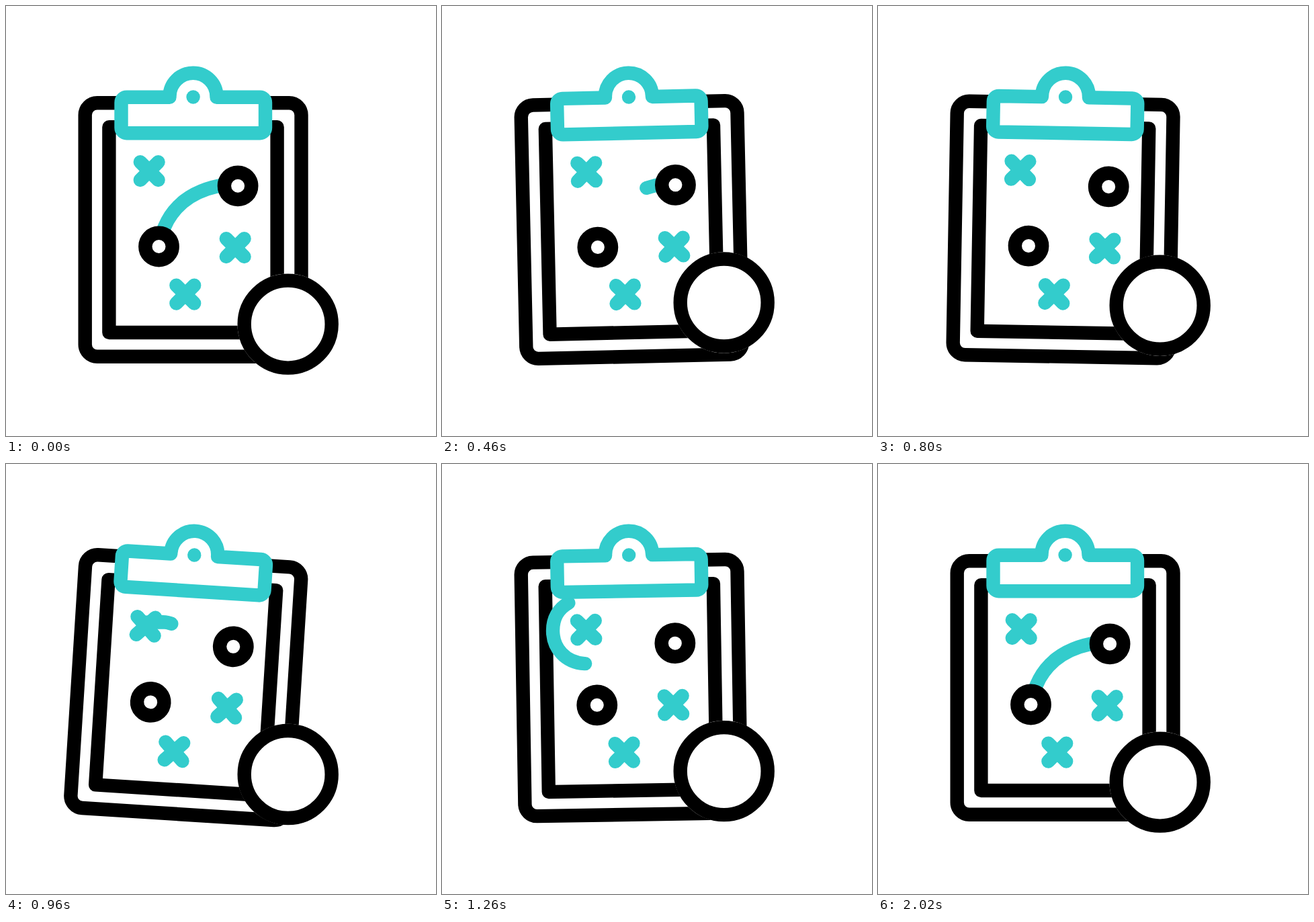
Write an HTML page that moves like this. It is 640 px wide and 640 px high and loops after 2.04 s.

```html
<!DOCTYPE html>
<html lang="en">
<head>
<meta charset="utf-8">
<title>Game plan clipboard</title>
<style>
  html, body { margin: 0; width: 100%; height: 100%; overflow: hidden; background: #fff; }
  svg { display: block; width: 100%; height: 100%; }
  svg * { stroke-linecap: round; stroke-linejoin: round; }
  .ink { fill: #fff; stroke: #000; stroke-width: 20.4; }
  .teal { fill: none; stroke: #3cc; stroke-width: 20.4; }
</style>
</head>
<body>
<svg viewBox="0 0 640 640">
  <defs>
    <path id="cross" class="teal" d="M-13.4-13.4 13.4 13.4M13.4-13.4-13.4 13.4"/>
  </defs>
  <g id="board">
    <rect class="ink" x="117.7" y="144.3" width="321.8" height="377.5" rx="18"/>
    <rect class="ink" x="153.4" y="180.2" width="250.2" height="305.8"/>
    <path id="pass" class="teal" pathLength="155" d="M227.5 358C238 297 280 268 345 264"/>
    <path id="run" class="teal" pathLength="300"
      d="M213 240L238 238C282 236 275 298 210 296C181 294 163.6 272 163.6 247C163.6 216 188 195 225 200"/>
    <use href="#cross" x="213.2" y="245.6"/>
    <use href="#cross" x="341.2" y="359.7"/>
    <use href="#cross" x="266.8" y="429.1"/>
    <circle class="ink" cx="345.1" cy="267.8" r="20.2"/>
    <circle class="ink" cx="227.5" cy="358" r="20.2"/>
    <path class="teal" style="fill:#fff"
      d="M243.5 135.7H179.5a8 8 0 0 0-8 8V181.2a8 8 0 0 0 8 8H378a8 8 0 0 0 8-8V143.7a8 8 0 0 0-8-8H313.5V134.7a35 35 0 0 0-70 0Z"/>
    <circle cx="278.6" cy="135.5" r="10.2" fill="#3cc"/>
  </g>
  <g id="ball">
    <circle cx="419.7" cy="473.6" r="75.2" fill="#fff"/>
    <circle class="ink" cx="419.7" cy="473.6" r="65"/>
  </g>
</svg>
<script>
const LOOP = 2040;
const $ = id => document.getElementById(id);
const [board, pass, run, ball] = ["board", "pass", "run", "ball"].map($);

const linear = u => u;
const sine = u => (1 - Math.cos(Math.PI * u)) / 2;

// Value at time t from [time, value] keys, held outside their range.
function tween(t, keys, ease = linear) {
  const i = keys.findIndex(k => k[0] > t);
  if (i < 0) return keys[keys.length - 1][1];
  if (i === 0) return keys[0][1];
  const [t0, a] = keys[i - 1], [t1, b] = keys[i];
  return a + (b - a) * ease((t - t0) / (t1 - t0));
}

const swing = [[0, 0], [220, 9.6], [600, -5.9], [920, 4.1], [1140, -1.9], [1380, 0]];
const bounces = [[0, 620, 42], [620, 1005, 28], [1005, 1400, 18]]; // start, end, height
const passTail = [[0, 0], [280, 99], [620, 127], [700, 155]];
const passHead = [[1580, 0], [1620, 31], [1960, 155]];
const runHead = [[900, 0], [960, 38], [1260, 262], [1620, 300]];
const runTail = [[1000, 0], [1260, 137], [1620, 222], [2000, 300]];

function lift(t) {
  const hop = bounces.find(([a, b]) => t >= a && t < b);
  if (!hop) return 0;
  const u = (t - hop[0]) / (hop[1] - hop[0]);
  return 4 * u * (1 - u) * hop[2];
}

// Show only the stretch of a path between two distances along it.
function trim(path, from, to) {
  path.style.display = to > from ? "" : "none";
  path.setAttribute("stroke-dasharray", `0 ${from} ${to - from} 999`);
  // A leading zero-length dash would leave a round dot, so shift past it.
  path.setAttribute("stroke-dasharray", `${to - from} 999`);
  path.setAttribute("stroke-dashoffset", -from);
}

function draw(now) {
  const t = now % LOOP;
  board.setAttribute("transform", `rotate(${tween(t, swing, sine)} 278.6 162)`);
  ball.setAttribute("transform", `translate(0 ${-lift(t)})`);
  if (t < 1000) trim(pass, tween(t, passTail), 155);
  else trim(pass, 0, tween(t, passHead));
  trim(run, tween(t, runTail), tween(t, runHead));
}

let start;
function frame(now) {
  start ??= now;
  draw(now - start);
  requestAnimationFrame(frame);
}
draw(0);
requestAnimationFrame(frame);
</script>
</body>
</html>
```
